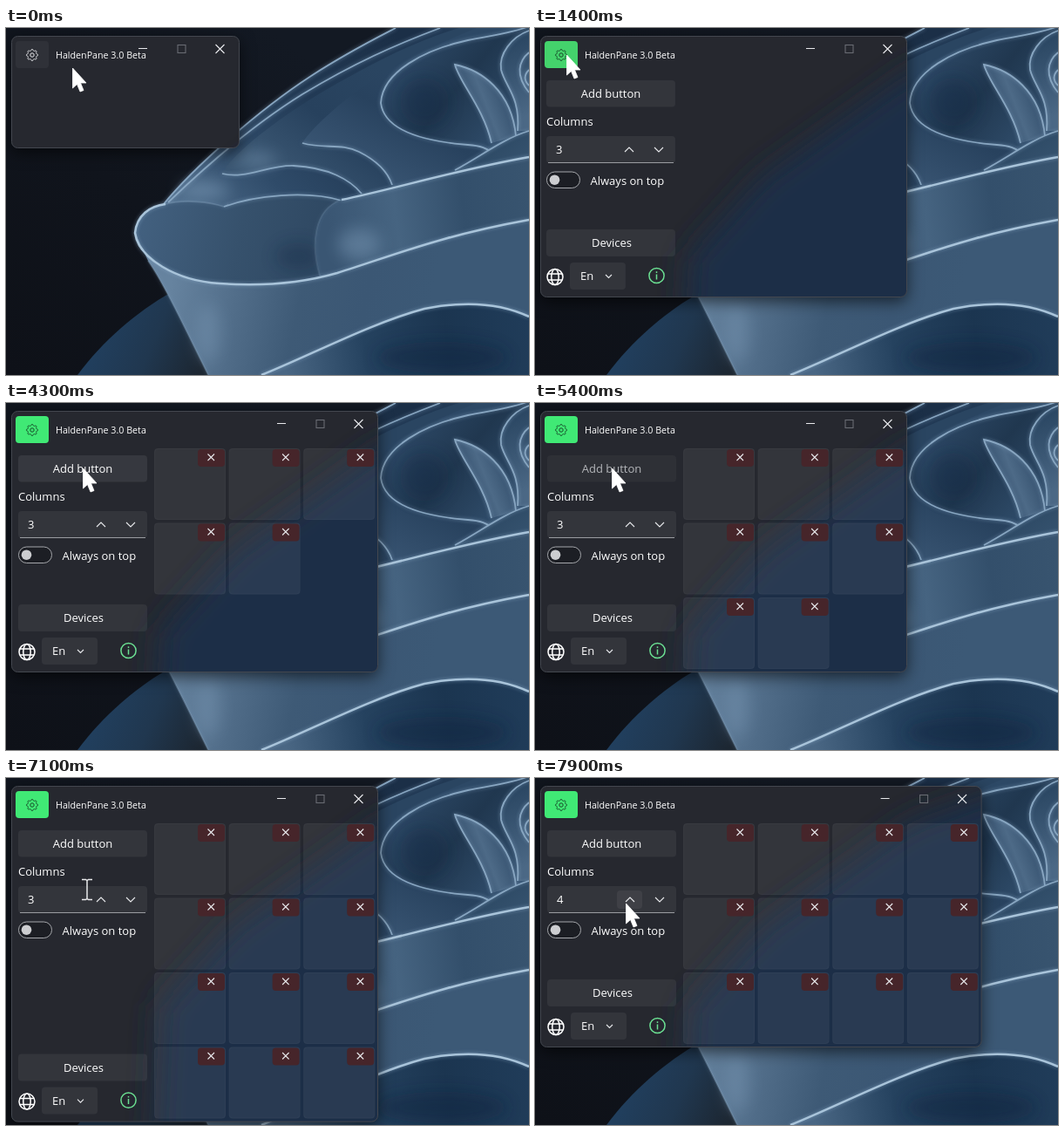
These frames come from a looping animation (600x398 px, 8000 ms). An HTML page:

```html
<!DOCTYPE html>
<html lang="en">
<head>
<meta charset="utf-8">
<title>Button deck demo</title>
<style>
  html, body { margin: 0; width: 100%; height: 100%; overflow: hidden; background: #10131b; }
  svg { display: block; width: 600px; height: 398px; }
  text { font: 500 13px "Open Sans", "Noto Sans", sans-serif; fill: #fff; }
  .edge, .rim { fill: none; filter: drop-shadow(0 0 2px #8fb0cfa0); }
  .edge { stroke: #88a6c1; stroke-width: 1.8; }
  .rim { stroke: #a9c4da; stroke-width: 2.5; }
  .glow { fill: #86a5c2; filter: url(#soft); }
  .shade { fill: #10243c; filter: url(#soft); }
  .line { fill: none; stroke: #e8e9ec; stroke-width: 1.1; }
  .box { fill: #fff; fill-opacity: .06; }
  #win { fill: #26282f; filter: drop-shadow(0 5px 9px #0009); }
  #frame { fill: none; stroke: #43474f; }
</style>
</head>
<body>
<svg id="stage" viewBox="0 0 600 398">
  <defs>
    <clipPath id="inside"><path d="M7 10H600V398H7Z"/></clipPath>
    <clipPath id="glass"><rect id="glassBox" x="6.5" y="9.5" rx="7"/></clipPath>
    <filter id="soft" x="-100%" y="-200%" width="300%" height="500%"><feGaussianBlur stdDeviation="9"/></filter>
    <filter id="frost" x="-20%" y="-20%" width="140%" height="140%"><feGaussianBlur stdDeviation="17"/></filter>
  </defs>

  <g id="wallpaper">
    <rect width="600" height="398" fill="url(#night)"/>
    <path fill="url(#far)" d="M180 203C215 160 290 94 350 55C390 29 420 14 447 0H600V260H200Z"/>
    <path class="edge" d="M180 203C215 160 290 94 350 55C390 29 420 14 447 0"/>
    <path fill="url(#back)" d="M186 200C238 150 290 107 340 76C400 40 445 20 498 0H600V260H200Z"/>
    <ellipse class="glow" cx="228" cy="186" rx="28" ry="9" opacity=".5"/>
    <path class="edge" d="M186 200C238 150 290 107 340 76C400 40 445 20 498 0"/>
    <path fill="url(#mid)" d="M248 167C262 140 330 90 390 58C430 36 470 15 520 0H600V220H410L408 188C395 172 370 160 330 158C300 157 275 174 248 167Z"/>
    <ellipse class="glow" cx="287" cy="151" rx="24" ry="8" opacity=".4"/>
    <path class="edge" d="M248 167C275 174 300 157 330 158C370 160 395 174 408 190"/>
    <path fill="url(#inner)" d="M340 132C352 112 400 70 440 48C480 26 510 12 540 0H600V200H445L443 178C438 165 425 152 405 142C385 133 365 139 340 132Z"/>
    <path class="edge" d="M340 132C365 139 385 132 405 142C425 152 438 165 443 180"/>
    <path fill="url(#cup)" d="M600-2C580 6 560 8 530 14C480 25 432 50 430 86C434 118 480 130 530 134C545 135 553 138 558 144L600 140Z"/>
    <ellipse class="shade" cx="480" cy="85" rx="28" ry="28" opacity=".35"/>
    <path class="edge" d="M600-2C580 6 560 8 530 14C480 25 432 50 430 86C434 118 480 130 530 134C545 135 553 138 558 144"/>
    <path fill="url(#leaf)" d="M515 42C545 48 580 72 585 124L557 132C548 92 520 62 515 42Z"/>
    <path class="edge" d="M557 132C548 92 520 62 515 42C545 48 580 72 585 124"/>
    <path fill="url(#bud)" d="M600 3C580 10 565 30 568 48C573 68 590 78 587 118H600Z"/>
    <path class="edge" d="M600 3C580 10 565 30 568 48C573 68 590 78 587 118M600 28C588 38 584 54 600 74M600 48C594 54 594 60 600 66"/>
    <path fill="url(#fold)" d="M515 163C545 147 570 127 600 118V200H480Z"/>
    <path class="edge" d="M515 163C545 147 570 127 600 118"/>

    <path fill="url(#low)" d="M82 398C110 360 150 325 190 303L240 398Z"/>
    <path fill="url(#bowl)" d="M183 202C205 196 235 200 250 205C285 192 345 186 385 198L400 295H245C195 290 152 264 148 235C150 215 165 204 183 202Z"/>
    <ellipse class="shade" cx="335" cy="262" rx="26" ry="16" opacity=".3"/>
    <path class="edge" d="M250 205C285 192 345 186 385 198"/>
    <path class="edge" opacity=".4" d="M183 202C205 196 235 200 250 205"/>
    <path fill="url(#band)" d="M362 290C350 250 352 208 385 197C440 185 520 162 600 148V230L370 292Z"/>
    <ellipse class="glow" cx="405" cy="248" rx="24" ry="18" opacity=".4"/>
    <path class="rim" d="M385 197C440 186 520 162 600 148"/>
    <path class="edge" opacity=".25" d="M385 197C352 208 350 250 360 284"/>
    <path fill="url(#cone)" d="M148 235C152 264 195 290 245 293C300 297 345 291 380 281C450 259 500 238 600 220V398H232C196 325 180 292 163 267Z"/>
    <ellipse class="glow" cx="232" cy="350" rx="14" ry="34" opacity=".3"/>
    <path class="rim" d="M183 202C165 204 150 215 148 235C152 264 195 290 245 293C300 297 345 291 380 281C450 259 500 238 600 220"/>
    <path class="edge" opacity=".4" d="M163 267C180 292 196 325 232 398"/>
    <path fill="url(#deep)" d="M293 398C350 375 420 338 480 322C530 312 570 317 600 331V398Z"/>
    <ellipse class="shade" cx="500" cy="378" rx="75" ry="18" opacity=".45"/>
    <path class="rim" d="M293 398C350 375 420 338 480 322C530 312 570 317 600 331"/>
  </g>

  <rect id="win" x="6.5" y="9.5" rx="7"/>
  <g clip-path="url(#glass)">
    <path fill="#1b2f47" filter="url(#frost)" d="M168 450L176 262L260 170L430 50L650-30V450Z"/>
  </g>
  <rect id="frame" x="6.5" y="9.5" rx="7"/>
  <g id="tiles"></g>

  <g clip-path="url(#inside)"><g id="panel">
    <rect id="add" class="box" x="14" y="60" width="148" height="30.5" rx="4"/>
    <text id="addText" x="88" y="80" text-anchor="middle">Add button</text>
    <text x="14" y="112">Columns</text>
    <rect class="box" x="14" y="124" width="148" height="31" rx="4"/>
    <path d="M16 154.5H160" stroke="#9a9ca1"/>
    <text id="count" x="25" y="144">3</text>
    <rect id="upHover" class="box" x="94" y="129" width="29" height="21" rx="4"/>
    <path class="line" d="M104 142L109 137L114 142M138 137L143 142L148 137"/>
    <rect x="14.5" y="165" width="38" height="18.5" rx="9.2" fill="#1c1e24" stroke="#a5a7ab"/>
    <circle cx="23.5" cy="174.2" r="5.8" fill="#cccdd0"/>
    <text x="64.5" y="180">Always on top</text>
    <g id="foot">
      <rect class="box" x="14" y="231" width="148" height="31" rx="4"/>
      <text x="89" y="251" text-anchor="middle">Devices</text>
      <g class="line" style="stroke: #fff; stroke-width: 1.5">
        <circle cx="24" cy="285.5" r="9"/><ellipse cx="24" cy="285.5" rx="4.2" ry="9"/>
        <path d="M16 282H32M16 289H32"/>
      </g>
      <rect class="box" x="41" y="269" width="64" height="31" rx="4"/>
      <text x="53" y="289">En</text>
      <path class="line" d="M82 283L85.5 286.5L89 283"/>
      <g fill="none" stroke="#6be092" stroke-width="1.5">
        <circle cx="140.5" cy="284" r="8.6"/><path d="M140.5 282.500V288.500M140.5 279.300V281"/>
      </g>
    </g>
  </g></g>

  <rect id="gearBox" x="11" y="15" width="38" height="31" rx="4"/>
  <g id="gear" fill="none"><path id="teeth"/><circle cx="30" cy="31" r="2.2"/></g>
  <text x="57" y="35" style="font-size: 10.7px">HaldenPane 3.0 Beta</text>
  <g id="controls" class="line">
    <path d="M-116 23.500H-106M-27.500 19L-17.500 29M-17.500 19L-27.500 29"/>
    <rect x="-71" y="19.500" width="9" height="9" stroke="#686b72"/>
  </g>

  <path id="arrow" fill="#fff" stroke="#fff" stroke-width=".8" d="M.5 0V23L5.500 18.500L9 27L13 25.500L9.500 17H16Z"/>
  <path id="beam" fill="none" stroke="#e9eaec" stroke-width="1.500" d="M-6-11.500H-1.500L0-10.500L1.500-11.500H6M0-10.500V10.500M-6 11.500H-1.500L0 10.500L1.500 11.500H6"/>
</svg>

<script>
const $ = id => document.getElementById(id);
const set = (id, attrs) => { for (const k in attrs) $(id).setAttribute(k, attrs[k]); };
const move = (id, x, y) => set(id, { transform: `translate(${x} ${y})` });
const show = (id, on) => set(id, { visibility: on ? 'visible' : 'hidden' });
const clamp = v => Math.min(1, Math.max(0, v));

function gradient(id, x1, y1, x2, y2, ...colors) {
  const stops = colors.map((c, i) => `<stop offset="${i / (colors.length - 1)}" stop-color="${c}"/>`).join('');
  document.querySelector('defs').insertAdjacentHTML('beforeend',
    `<linearGradient id="${id}" gradientUnits="userSpaceOnUse" x1="${x1}" y1="${y1}" x2="${x2}" y2="${y2}">${stops}</linearGradient>`);
}
gradient('night', 0, 398, 300, 0, '#0e1118', '#10141c', '#131923');
gradient('far', 200, 200, 440, 0, '#3f5c7a', '#243c56', '#1b2f47');
gradient('back', 200, 205, 340, 70, '#4f6d8b', '#2f4b69', '#223a55');
gradient('mid', 320, 175, 420, 40, '#3b5773', '#27415d', '#2a4561');
gradient('inner', 400, 170, 480, 20, '#3a5674', '#28425e', '#2d4966');
gradient('cup', 440, 40, 560, 140, '#2e4a68', '#20374f', '#304d6b');
gradient('leaf', 525, 95, 575, 75, '#2f4a67', '#4d6a87', '#35516e');
gradient('bud', 568, 20, 600, 100, '#2b4763', '#4b6885');
gradient('fold', 540, 130, 570, 170, '#2b4762', '#35526e');
gradient('low', 110, 340, 225, 390, '#213f5e', '#20374f', '#1c2631');
gradient('bowl', 150, 215, 385, 270, '#436180', '#36516c', '#2d4660');
gradient('band', 370, 220, 600, 190, '#3a5673', '#466481', '#334f6b', '#38546f');
gradient('cone', 190, 290, 480, 350, '#66839f', '#526e8a', '#3e5a76', '#3b5774', '#3c5976');
gradient('deep', 320, 390, 600, 350, '#4a6784', '#25425f', '#1b3550', '#203c59');

// Gear outline: a circle whose radius ripples eight times.
let teeth = '';
for (let i = 0; i < 96; i++) {
  const a = i / 96 * Math.PI * 2, r = 5.8 + Math.tanh(1.5 * Math.cos(a * 8)) * .8;
  teeth += `${i ? 'L' : 'M'}${30 + r * Math.cos(a)} ${31 + r * Math.sin(a)}`;
}
set('teeth', { d: teeth + 'Z' });

const clicks = [2200, 2640, 3080, 3540, 3980, 4460, 4800, 5150, 5460, 5800, 6150, 6500];
const OPEN = 1100, WIDEN = 7600, LOOP = 8000;
$('tiles').innerHTML = clicks.map((_, i) => `<g id="tile${i}">
  <rect width="82" height="82" rx="4" fill="#fff" fill-opacity=".06"/>
  <rect x=".5" y=".5" width="81" height="81" rx="4" fill="none" stroke="#fff" stroke-opacity=".025"/>
  <rect x="50" y="1" width="31" height="20" rx="4" fill="#46252a"/>
  <path class="line" d="M61.500 6.500L69 14M69 6.500L61.500 14"/></g>`).join('');

const path = [[0, 76, 46], [350, 76, 46], [900, 36, 31], [1450, 36, 31], [1950, 88, 75],
  [6650, 88, 75], [7050, 93, 128], [7200, 93, 128], [7480, 104, 144], [LOOP, 104, 144]];
function pointer(t) {
  const i = path.findIndex(p => p[0] > t), [t0, x0, y0] = path[i - 1], [t1, x1, y1] = path[i];
  const u = (t - t0) / (t1 - t0), e = u * u * (3 - 2 * u);
  return [x0 + (x1 - x0) * e, y0 + (y1 - y0) * e];
}

function draw(t) {
  const open = t >= OPEN, cols = t < WIDEN ? 3 : 4;
  const added = clicks.filter(c => c <= t).length;
  const rows = Math.max(3, Math.ceil(added / cols));
  const right = open ? 427 + (cols - 3) * 85.6 : 268;
  const bottom = open ? 309 + (rows - 3) * 85.6 : 138;
  const [x, y] = pointer(t);

  for (const id of ['win', 'glassBox', 'frame']) set(id, { width: right - 7, height: bottom - 10 });
  move('controls', right, 0);
  show('panel', open);
  move('panel', -155 * (1 - clamp((t - OPEN) / 370)) ** 3, 0);
  move('foot', 0, bottom - 309);

  const overGear = x < 49 && y < 46;
  set('gearBox', { fill: open ? (overGear ? '#44d36c' : '#40e975') : '#fff',
    'fill-opacity': open ? 1 : overGear ? .08 : .045 });
  set('gear', { stroke: open ? '#174a29' : '#e8e9ec' });

  const pressed = clicks.some(c => t >= c - 110 && t < c);
  const overAdd = y > 60 && y < 90 && x > 50;
  set('add', { style: `fill-opacity:${pressed ? .035 : overAdd ? .075 : .06}` });
  set('addText', { style: `fill:${pressed ? '#b4b6ba' : '#fff'}` });
  $('count').textContent = cols;
  show('upHover', open && x > 95 && y > 129);

  const age = added ? t - clicks[added - 1] : 0;
  clicks.forEach((_, i) => {
    move('tile' + i, 170 + i % cols * 85.6, 52 + Math.floor(i / cols) * 85.5);
    set('tile' + i, { opacity: i >= added ? 0 : i ? 1 : clamp(age / 240) });
  });

  const typing = y > 120 && y < 155 && x < 96;
  show('arrow', !typing);
  show('beam', typing);
  move('arrow', x, y);
  move('beam', x, y);
}

function tick() {
  draw(performance.now() % LOOP);
  requestAnimationFrame(tick);
}
tick();
</script>
</body>
</html>
```
